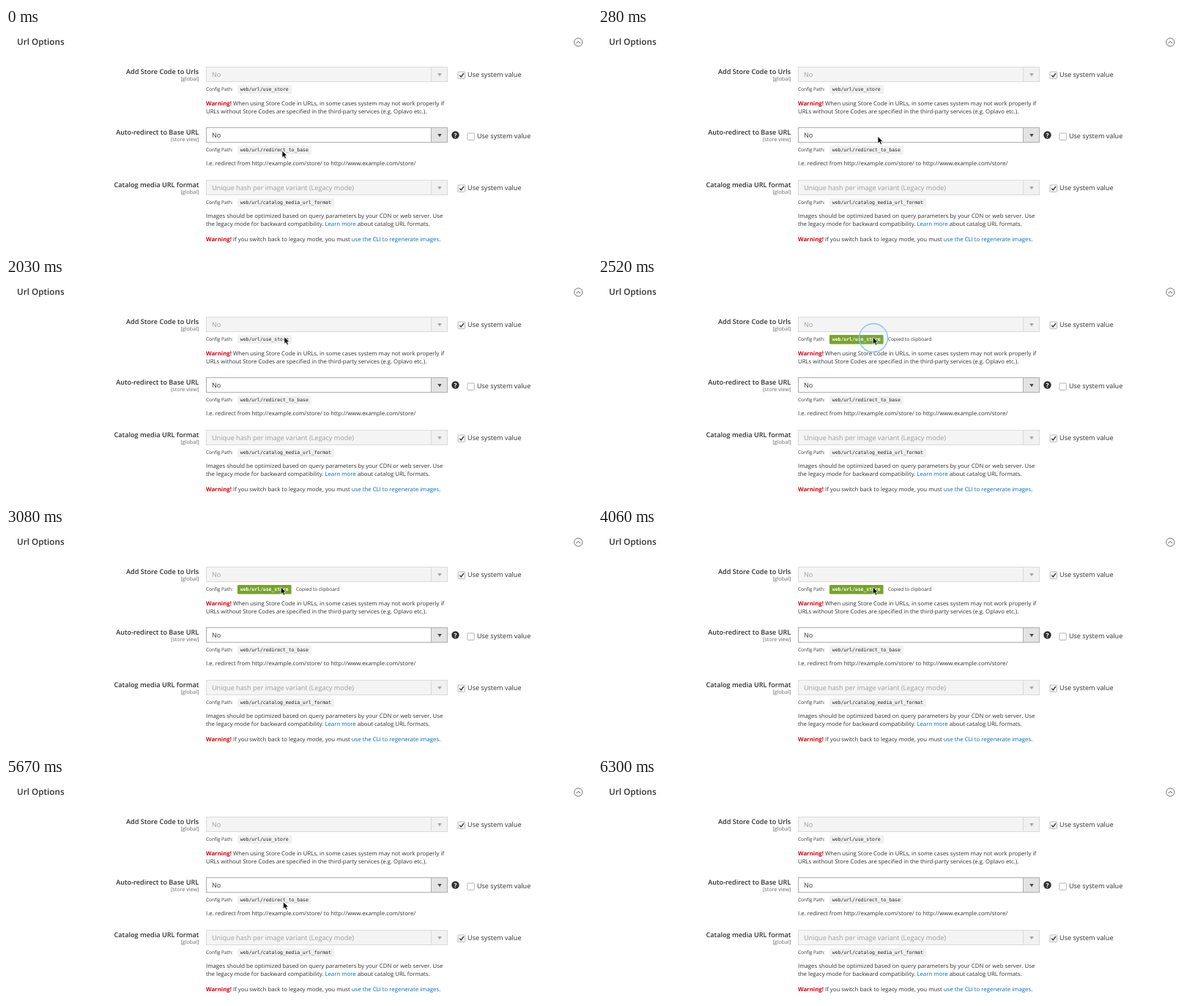
An HTML page for the animation above (7 s loop, 800 px wide and 304 px high).

```html
<!DOCTYPE html>
<html lang="en">
<head>
<meta charset="utf-8">
<title>Url Options</title>
<style>
  html, body { margin: 0; width: 100%; height: 100%; overflow: hidden; background: #fff; }
  svg { display: block; width: 800px; height: 304px; }
  text { font-family: "Open Sans", sans-serif; fill: #303030; text-rendering: geometricPrecision; white-space: pre; }
  .title { font-size: 11.7px; font-weight: 600; }
  .label { font-size: 9.15px; font-weight: 600; text-anchor: end; }
  .scope { font-size: 7.15px; text-anchor: end; fill: #666; }
  .field { font-size: 9.1px; }
  .note { font-size: 7.82px; }
  .small { font-size: 6.5px; }
  .code { font-family: "DejaVu Sans Mono", monospace; font-size: 6.45px; fill: #222; }
  .warn { font-weight: 700; fill: #d8000c; }
  .link { fill: #006bb4; }
  .help { font-size: 8.5px; font-weight: 700; fill: #fff; text-anchor: middle; }
</style>
</head>
<body>
<svg viewBox="0 0 800 304">
  <text class="title" x="15" y="23">Url Options</text>
  <g fill="none" stroke="#514943">
    <circle cx="781.3" cy="19.5" r="5.6" stroke-width=".8"/>
    <path d="M778.5 21l2.8-2.8 2.8 2.8" stroke-width="1"/>
  </g>
  <g id="rows"></g>
  <circle cx="613.5" cy="146.5" r="5.2" fill="#33302d"/>
  <text class="help" x="613.5" y="149.6">?</text>

  <text class="note" x="273" y="105.5"><tspan class="warn">Warning!</tspan> When using Store Code in URLs, in some cases system may not work properly if</text>
  <text class="note" x="273" y="116.5">URLs without Store Codes are specified in the third-party services (e.g. Oplavo etc.).</text>
  <text class="note" x="273" y="187.7">I.e. redirect from http://example.com/store/ to http://www.example.com/store/</text>
  <text class="note" x="273" y="260.3">Images should be optimized based on query parameters by your CDN or web server. Use</text>
  <text class="note" x="273" y="271.2">the legacy mode for backward compatibility. <tspan class="link">Learn more</tspan> about catalog URL formats.</text>
  <text class="note" x="273" y="292.2"><tspan class="warn">Warning!</tspan> If you switch back to legacy mode, you must <tspan class="link">use the CLI to regenerate images</tspan>.</text>

  <g id="copied">
    <rect x="316" y="78" width="73.5" height="12.5" rx="1" fill="#79a22e"/>
    <text class="code" x="319.8" y="86.3" style="fill:#fff;font-weight:700">web/url/use_store</text>
    <text class="small" x="396" y="86.3">Copied to clipboard</text>
  </g>
  <circle id="ring" cx="376" cy="82" fill="#8cc4ea" fill-opacity=".08" stroke="#8cc4ea" stroke-width="1.4"/>
  <path id="cursor" d="M0 0V9.6L2.2 7.5 3.8 11 5.5 10.3 4 6.8H6.9Z" fill="#000" stroke="#fff" stroke-width=".7"/>
</svg>
<script>
const LOOP = 7000, STEP = 70;
const $ = id => document.getElementById(id);

function row({ y, label, scope, value, path, enabled }) {
  const line = enabled ? '#adadad' : '#dadada';
  const ink = enabled ? '#303030' : '#9c9c9c';
  const boxX = enabled ? 629.9 : 617.1, boxY = y + (enabled ? 8 : 7);
  const tick = enabled ? '' :
    `<path d="M${boxX + 2} ${boxY + 4.6}l2.2 2.4 3.6-5" fill="none" stroke="#303030" stroke-width="1.3"/>`;
  return `
    <text class="label" x="263.3" y="${y + 9.5}">${label}</text>
    <text class="scope" x="263.3" y="${y + 18.6}">[${scope}]</text>
    <rect x="273.5" y="${y + .5}" width="329" height="20" fill="${enabled ? '#fff' : '#f4f4f4'}" stroke="${line}"/>
    <rect x="580.5" y="${y + .5}" width="22" height="20" fill="${enabled ? '#e3e3e3' : '#f1f1f1'}" stroke="${line}"/>
    <path d="M589.2 ${y + 9}h5.6l-2.8 4.2z" fill="${enabled ? '#514943' : '#a8a4a1'}"/>
    <text class="field" x="281" y="${y + 14.2}" style="fill:${ink}">${value}</text>
    <rect x="${boxX}" y="${boxY}" width="9.4" height="9.4" rx=".8" fill="#fff" stroke="#adadad" stroke-width=".9"/>${tick}
    <text class="field" x="${boxX + 13}" y="${boxY + 7.4}">Use system value</text>
    <text class="small" x="273" y="${y + 33.3}">Config Path:</text>
    <rect x="316.5" y="${y + 25.5}" width="${path.length * 3.88 + 7.5}" height="11.5" rx="1" fill="#f0f0f0"/>
    <text class="code" x="319.8" y="${y + 33.3}">${path}</text>`;
}

$('rows').innerHTML = [
  { y: 53, label: 'Add Store Code to Urls', scope: 'global', value: 'No', path: 'web/url/use_store' },
  { y: 136, label: 'Auto-redirect to Base URL', scope: 'store view', value: 'No', path: 'web/url/redirect_to_base', enabled: true },
  { y: 208, label: 'Catalog media URL format', scope: 'global', value: 'Unique hash per image variant (Legacy mode)', path: 'web/url/catalog_media_url_format' }
].map(row).join('');

// Cursor stops: time, x, y
const stops = [
  [0, 377, 168], [280, 382, 148.5], [980, 382, 148.5], [1750, 382, 80.5], [2520, 375.3, 81],
  [5110, 375.3, 81], [5810, 379, 180], [5950, 380, 190], [6020, 380, 190], [6300, 382, 312], [LOOP, 382, 312]
];
const ramp = (t, a, b) => Math.min(1, Math.max(0, (t - a) / (b - a)));
const ease = p => p * p * (3 - 2 * p);

function draw(now) {
  const t = Math.floor(now % LOOP / STEP) * STEP;
  const i = stops.findIndex(s => s[0] > t);
  const [t0, x0, y0] = stops[i - 1], [t1, x1, y1] = stops[i];
  const p = ease(ramp(t, t0, t1));
  $('cursor').setAttribute('transform', `translate(${x0 + (x1 - x0) * p} ${y0 + (y1 - y0) * p})`);
  $('copied').setAttribute('opacity', ramp(t, 2310, 2520) * (1 - ramp(t, 4410, 4620)));
  $('ring').setAttribute('r', 8 + 11.5 * ramp(t, 2310, 2520));
  $('ring').setAttribute('opacity', ramp(t, 2310, 2450) * (1 - ramp(t, 2520, 2730)));
}

const start = performance.now();
function tick() {
  draw(performance.now() - start);
  requestAnimationFrame(tick);
}
tick();
</script>
</body>
</html>
```
